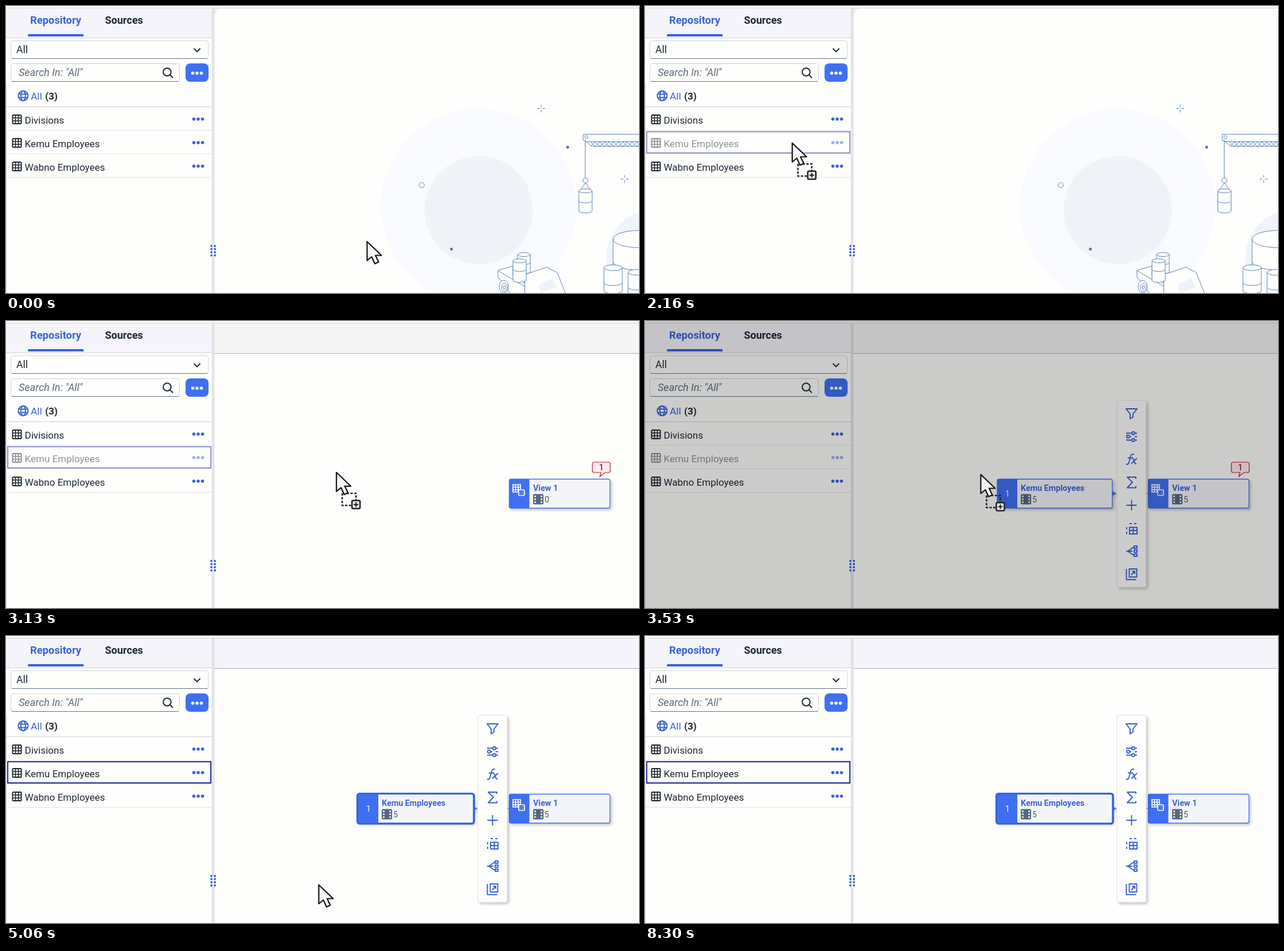
Animation of 1100x500 px, one loop 8.7 s. Source, as an HTML page:

```html
<!DOCTYPE html>
<html lang="en">
<head>
<meta charset="utf-8">
<title>Drag a table onto the canvas</title>
<style>
  html, body { margin: 0; width: 100%; height: 100%; overflow: hidden; background: #fefefc; }
  svg { display: block; width: 1100px; height: 500px; }
  text { font-family: Roboto, "Open Sans", sans-serif; font-size: 17px; fill: #1c2733; }
  .bold { font-weight: 700; }
  .blue { fill: #3a62da; }
  .white { fill: #fff; }
  .small { font-size: 14.3px; }
  .count { font-size: 14px; fill: #4c5a6c; }
  .line { fill: none; stroke: #1c2733; stroke-width: 2; }
  .tool { fill: none; stroke: #3560d8; stroke-width: 1.9; stroke-linejoin: round; }
  .art { fill: #fefefc; stroke: #5b84b8; stroke-width: 1; }
  .shadow { filter: drop-shadow(3px 3px 2px #0003); }
</style>
</head>
<body>
<svg viewBox="0 0 1100 500">
  <defs>
    <g id="grid" class="line" stroke-width="1.8">
      <rect x="1" y="1" width="15" height="15" rx="1.5"/>
      <path d="M6 1v15M11 1v15M1 6h15M1 11h15" stroke-width="1.7"/>
    </g>
    <path id="dots" d="M0 0h0M7.5 0h0M15 0h0" stroke-width="5.6" stroke-linecap="round"/>
    <path id="spark" d="M-7 0h5M2 0h5M0-7v5M0 2v5" class="art"/>
    <g id="columns">
      <rect width="18" height="18" rx="2" fill="#56677f"/>
      <path d="M2 4h3M2 9h3M2 14h3M13 4h3M13 9h3M13 14h3" stroke="#f4f5f8" stroke-width="2.6"/>
    </g>
    <path id="arrow" d="M0 0V33L8 26.5L13.500 38.500L20 35.500L14.500 24H25Z"
      fill="#f5f5f5" stroke="#151515" stroke-width="2.2" stroke-linejoin="round"/>
  </defs>

  <rect width="1100" height="500" fill="#fefefc"/>
  <path d="M0 3.500H1100" stroke="#d9d9dc" stroke-width="1.5"/>

  <g id="welcome">
    <path d="M362 22V4h18q-18 0-18 18" fill="#ededf0"/>
    <circle cx="821" cy="349" r="170" fill="#f9fafd"/>
    <circle cx="821.500" cy="355.500" r="94" fill="#eff3f7"/>
    <circle cx="1130" cy="440" r="87" fill="#f0f3f9"/>
    <use href="#spark" x="930" y="178.500"/>
    <use href="#spark" x="1075" y="301.500"/>
    <circle cx="976" cy="246" r="2.500" fill="#4a79b5"/>
    <circle cx="774" cy="423.500" r="2.500" fill="#4a79b5"/>
    <circle cx="722.500" cy="312" r="4.500" class="art" stroke-width="1.3"/>
    <path d="M1110 223.500H1003V233L1019 244.500H1110ZM1003 233.500L1010 236.500H1110" class="art"/>
    <path id="truss" class="art" style="fill:none"/>
    <circle cx="1008.500" cy="228.500" r="2.700" class="art"/>
    <path d="M1006.500 235V300M1007 308L997 322M1007 308L1017 322" class="art"/>
    <circle cx="1007" cy="304" r="4.500" class="art"/>
    <g id="cylinders"></g>
    <path d="M855 460.500L881 453V470L901 482V468L940 455L958 464.500L974 505H880L855 472Z" class="art"/>
    <path d="M855 461L902 489M901.500 468V500" class="art"/>
    <path d="M925 486L950 474L957 490L930 500Z" fill="#eff2f8"/>
    <g id="tanks"></g>
    <ellipse cx="865" cy="489" rx="8" ry="11" class="art"/>
    <ellipse cx="866" cy="490" rx="5" ry="7" class="art"/>
    <ellipse cx="866" cy="490" rx="2" ry="3" class="art"/>
  </g>

  <g id="diagram">
    <rect id="bar" x="362" y="4" width="738" height="52"/>
    <path d="M362 56.500H1100" stroke="#a9adc9"/>
    <g id="tableNode">
      <path d="M812 300.500H874" stroke="#3f6fee"/>
      <g class="shadow" id="tableBox"></g>
      <rect id="selected" x="610.500" y="274.500" width="203" height="52.500" rx="4" fill="none" stroke="#3463dc" stroke-width="3"/>
      <text x="630" y="305.500" text-anchor="middle" class="white" style="font-size:14px">1</text>
      <text x="653" y="296" class="bold small blue">Kemu Employees</text>
      <use href="#columns" x="653" y="301.500"/>
      <text x="673" y="316" class="count">5</text>
    </g>
    <g class="shadow" id="viewBox"></g>
    <g fill="#4070f2" stroke="#fff" stroke-width="1.7">
      <path d="M881 285h13v13h-13zM881 289.500h13M885.500 285v13M890 285v13M881 294h13"/>
      <rect x="891" y="294" width="10" height="10" rx="1.500"/>
      <path d="M894 297.500h0.500M897.500 297.500h1M894 301h0.500M897.500 301h1"/>
    </g>
    <text x="916" y="296" class="bold small blue">View 1</text>
    <use href="#columns" x="916" y="301.500"/>
    <text id="viewCount" x="936" y="316" class="count"></text>
    <g id="warning">
      <path d="M1022 246h25q3 0 3 3v12q0 3-3 3h-6l-9 7 2-7h-12q-3 0-3-3v-12q0-3 3-3z" fill="#ffecf0" stroke="#c8102e" stroke-width="1.200"/>
      <text x="1034.500" y="260" text-anchor="middle" style="font-size:14px;font-weight:500;fill:#a01525">1</text>
    </g>
    <g id="toolbar">
      <rect x="820" y="138" width="51" height="326" rx="4" fill="#fefefc" stroke="#e0e0e4" class="shadow"/>
      <path class="tool" d="M836 153h19l-7 9v5l-5 3.500v-8.500z
        M836 195.500h10M851 195.500h4M836 201.500h1M842 201.500h3M851 201.500h4M836 207.500h9M851 207.500h4
        M846 195.500a2.500 2.500 0 1 0 5 0a2.500 2.500 0 1 0-5 0M837 201.500a2.500 2.500 0 1 0 5 0a2.500 2.500 0 1 0-5 0M846 207.500a2.500 2.500 0 1 0 5 0a2.500 2.500 0 1 0-5 0
        M850 232.500q-5-2-6 3l-3 11q-1 4-5 3M839 238.500h9M846 239q3 0 4 5t4 5M855 239l-10 9.500
        M853 275v-3h-15l9 9l-9 9.500h15v-3
        M836.500 321h18M845.500 312v18
        M842 359.500h13v11.500h-13zM848.500 359.500v11.500M842 365h13M842 353h4M850 353h4M837 359v4M837 367v4
        M849 394l-10 7l10 7M836 401h11M850 392h5v4h-5zM850 399h5v4h-5zM850 406h5v4h-5z
        M841.500 432h13v14h-13zM836.500 432v18.500h17M845 442.500l6-6.500M846.500 436h4.500v4.500"/>
    </g>
    <g id="ghost" opacity=".85"><g class="shadow" id="ghostBox"></g></g>
  </g>

  <rect y="4" width="358" height="51" fill="#f4f4fa"/>
  <path d="M0 55.500H358" stroke="#d2d3d8"/>
  <rect x="358" y="4" width="4" height="496" fill="#ededf1"/>
  <path d="M358.500 4V500M361.500 4V500" stroke="#d0d1d7"/>
  <path d="M.5 136V500" stroke="#dcdce0"/>
  <text x="42" y="31" class="bold blue" style="font-size:18.300px">Repository</text>
  <text x="172" y="31" class="bold" style="font-size:18px">Sources</text>
  <path d="M38 53V51q0-2 2-2h93q2 0 2 2v2z" class="blue"/>

  <g fill="#fefefc" stroke="#d0d2d9">
    <rect x="8.500" y="60.500" width="343" height="31" rx="4"/>
    <rect x="8.500" y="100.500" width="293" height="31" rx="4"/>
    <path d="M10 91.500h340M10 131.500h290" stroke="#5c7382"/>
  </g>
  <text x="18" y="82" style="font-size:17.500px">All</text>
  <path d="M326.500 74l5.500 5.500l5.500-5.500" class="line"/>
  <text x="22" y="122" style="font-size:18px;font-style:italic;fill:#5d6a7a">Search In: "All"</text>
  <g class="line"><circle cx="280" cy="115" r="6.800"/><path d="M285 120l5 5"/></g>
  <rect x="312" y="100" width="40" height="32" rx="8" fill="#4070f2"/>
  <use href="#dots" x="324.500" y="117" stroke="#fff"/>
  <g class="tool" stroke-width="1.5">
    <circle cx="29.800" cy="156.500" r="8.500"/><ellipse cx="29.800" cy="156.500" rx="4" ry="8.500"/>
    <path d="M21.500 153.500h17M21.500 159.500h17"/>
  </g>
  <text x="43" y="163" class="blue" style="font-size:17.300px">All</text>
  <text x="68" y="163" class="bold">(3)</text>
  <path d="M0 175.500H358" stroke="#cfd0d5"/>
  <path d="M0 216.500H358M0 257.500H358M0 298.500H358" stroke="#e3e3e7"/>
  <g id="rows"></g>
  <rect id="focus" x="3" y="219" width="353" height="37" fill="none" stroke="#222b94" stroke-width="2"/>
  <rect x="354" y="416" width="12" height="21" fill="#fefefc"/>
  <path d="M357 418V436M363 418V436" stroke="#3a62da" stroke-width="4" stroke-linecap="round" stroke-dasharray="0 5.500"/>

  <rect id="shade" width="1100" height="500"/>
  <g id="cursor">
    <g id="pointer"><use href="#arrow"/></g>
    <path id="hand" d="M-8 21L-18 8Q-22 1-18 0Q-14 0-9 7L-13-11Q-14-15-10-15.500Q-7-15-6-11L-3-3V-16Q-4-20-1-20Q3-20 3-16V-4L6-14Q7-18 10-17Q13-16 12-12L10-2L14-8Q17-11 19-9Q20-7 18-3L14 9Q12 14 12 21Z"
      fill="#f1f6f9" stroke="#20262a" stroke-width="2.400" stroke-linejoin="round"/>
    <g id="copy" fill="none" stroke="#222">
      <path d="M10 36.500V57.500H34V36.500Z" stroke-width="2.600" stroke-dasharray="4 2.500"/>
      <use href="#arrow"/>
      <rect x="27" y="49" width="14" height="14" rx="2" fill="#f0f0f0" stroke-width="2.600"/>
      <path d="M34 52v8M30 56h8" stroke-width="2.200"/>
    </g>
  </g>
</svg>
<script>
const LOOP = 8700;
const $ = id => document.getElementById(id);
const show = (id, on) => { $(id).style.display = on ? '' : 'none'; };

const cylinder = (cx, top, rx, ry, height, seam) => {
  const arc = y => `M${cx - rx} ${y}a${rx} ${ry} 0 0 0 ${2 * rx} 0`;
  return `<path class="art" d="${arc(top + height)}V${top}a${rx} ${ry} 0 0 0 ${-2 * rx} 0z"/>
    <path class="art" d="${arc(top)}${arc(top + seam)}"/>`;
};
const node = (x, y, w) => `<rect x="${x}" y="${y}" width="${w}" height="50.500" rx="3" fill="#f4f5f8"/>
  <path d="M${x + 35} ${y}h-32q-3 0-3 3v44.500q0 3 3 3h32z" fill="#4070f2"/>
  <rect x="${x}" y="${y}" width="${w}" height="50.500" rx="3" fill="none" stroke="#3f6fee" stroke-width="1.300"/>`;
const port = (x, y) => `<path d="M${x} ${y - 4.5}l7 4.500l-7 4.500z" fill="#3f6fee"/>`;

$('cylinders').innerHTML = cylinder(1007, 322, 11.5, 3.5, 35, 17.5) +
  cylinder(1100, 406, 45, 15, 110, 39) + cylinder(1055, 456, 16, 5, 40, 26) + cylinder(1097, 464, 16, 5, 50, 26);
$('tanks').innerHTML = cylinder(900, 433, 11, 3.5, 30, 14) + cylinder(892.5, 444, 11.5, 3.5, 34, 15);
let truss = '';
for (let x = 1016; x < 1100; x += 8) truss += `M${x} 237l8 7.500M${x} 244.500l8-7.500`;
$('truss').setAttribute('d', truss);

$('tableBox').innerHTML = node(612, 275.5, 200) + port(812, 300.5);
$('viewBox').innerHTML = node(874.5, 275.5, 175);
$('ghostBox').innerHTML = `<g>${node(-16.5, -4, 200)}${port(183.5, 21)}</g>
  <rect x="-16" y="-3" width="34.500" height="49" fill="#fff" opacity=".3"/>
  <rect x="19" y="-3" width="164" height="49" fill="#eee" opacity=".8"/>`;
$('rows').innerHTML = ['Divisions', 'Kemu Employees', 'Wabno Employees'].map((name, i) => {
  const y = 41 * i;
  return `<g id="row${i}"><use href="#grid" x="10.500" y="${189 + y}"/>
    <text x="32.500" y="${205 + y}">${name}</text>
    <use href="#dots" x="326.500" y="${197 + y}" stroke="#3a62da"/></g>`;
}).join('');

// Pointer path: time, x, y
const path = [
  [800, 627.5, 410.5], [1500, 281, 258], [1700, 183, 224], [2200, 262, 240], [2600, 376, 257],
  [2630, 386.5, 256.5], [2890, 497, 233], [3160, 583.5, 267.5], [4300, 583.5, 267.5],
  [4330, 584, 250], [4700, 563, 350], [5060, 543.5, 433.5], [8100, 543.5, 433.5], [8300, 550, 502]
];
function pointerAt(t) {
  const next = path.findIndex(p => p[0] > t);
  if (next < 1) return (next ? path[path.length - 1] : path[0]).slice(1);
  const [a, b] = [path[next - 1], path[next]];
  const k = (t - a[0]) / (b[0] - a[0]);
  return [a[1] + (b[1] - a[1]) * k, a[2] + (b[2] - a[2]) * k];
}

function draw(t) {
  const [x, y] = pointerAt(t);
  const dragging = t >= 1730 && t < 3530;
  const onCanvas = t >= 1730 && (x > 362 || t > 2600);
  const dropped = t >= 3530;
  const done = t >= 3900;
  const copying = t >= 1730 && t < 4330;
  const grabbing = t < 1730 && x < 358;

  show('welcome', !onCanvas);
  show('diagram', onCanvas);
  show('tableNode', dropped);
  show('toolbar', dropped);
  show('selected', done);
  show('warning', !done);
  show('ghost', onCanvas && t < 2890);
  $('ghost').setAttribute('transform', `translate(${x},${y})`);
  $('bar').setAttribute('fill', done ? '#f4f4fa' : '#f5f5f5');
  $('viewCount').textContent = dropped ? 5 : 0;

  $('row1').setAttribute('opacity', t >= 1730 && !done ? .5 : 1);
  show('focus', dragging || done);
  $('focus').setAttribute('opacity', done ? 1 : .5);

  const fade = Math.min(1, (t - 3530) / 200);
  $('shade').setAttribute('opacity', dropped && !done ? .2 + .3 * fade : 0);

  show('cursor', t < 8300);
  show('pointer', !grabbing && !copying);
  show('hand', grabbing);
  show('copy', copying);
  $('cursor').setAttribute('transform', `translate(${x},${y})`);
}

const start = performance.now();
function tick() {
  draw((performance.now() - start) % LOOP);
  requestAnimationFrame(tick);
}
tick();
</script>
</body>
</html>
```
